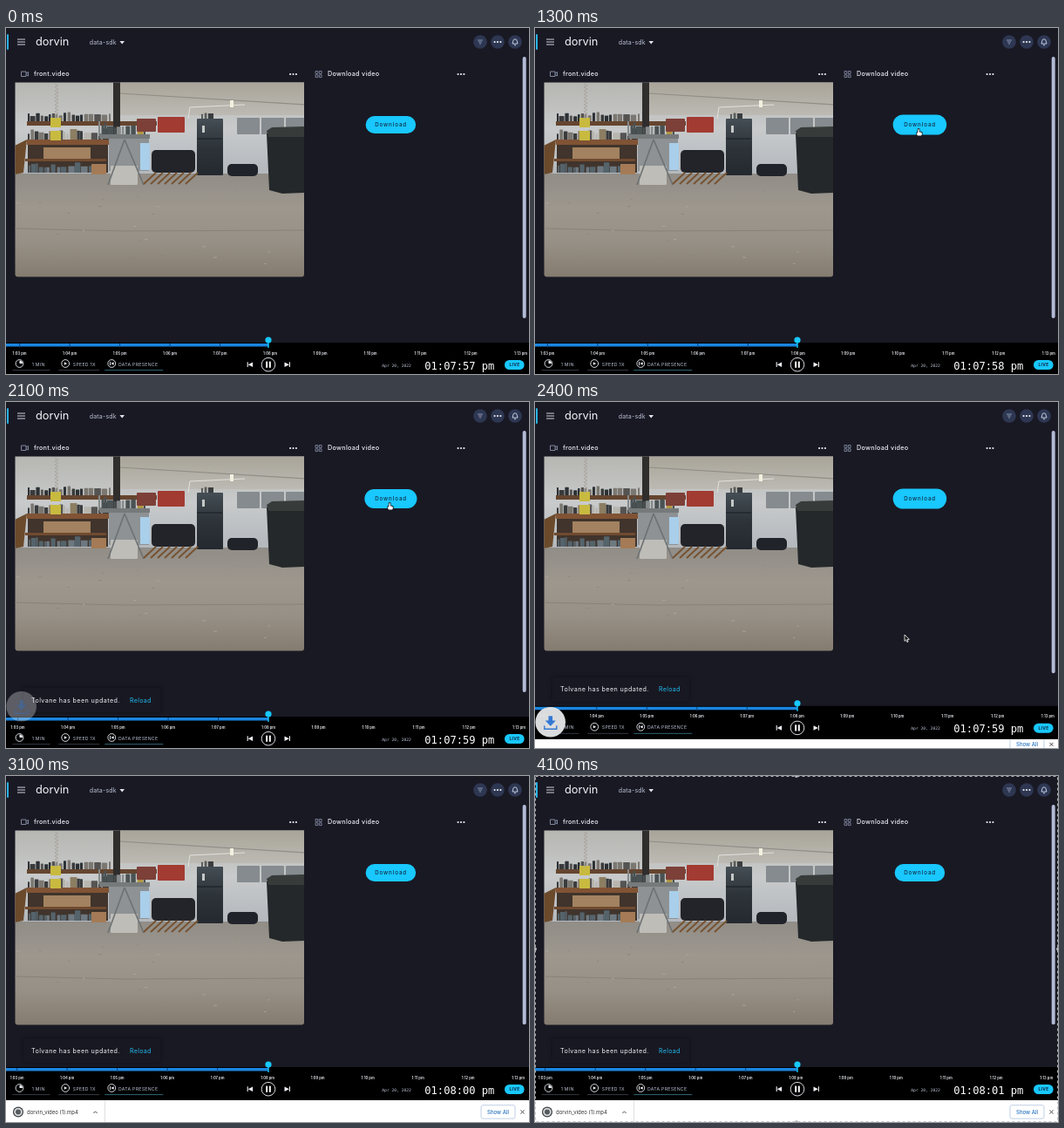
These frames come from a looping animation (600x397 px, 4.2 s). An HTML page with a canvas:

```html
<!DOCTYPE html>
<html lang="en">
<head>
<meta charset="utf-8">
<title>Robot video console</title>
<style>
  html, body { margin: 0; width: 100%; height: 100%; overflow: hidden; background: #191924; }
  canvas { display: block; width: 600px; height: 397px; }
</style>
</head>
<body>
<canvas id="stage"></canvas>
<script>
const W = 600, H = 397, LOOP = 4200, STEP = 100;
const CYAN = '#18c8ff', BG = '#191924', MUTED = '#bcc4d6', LIGHT = '#eef0f5';
const SANS = 'Inter, sans-serif', MONO = '"DejaVu Sans Mono", monospace';

const canvas = document.getElementById('stage');
const ctx = canvas.getContext('2d');
const dpr = window.devicePixelRatio || 1;
canvas.width = W * dpr;
canvas.height = H * dpr;

// Progress from 0 to 1 between two times.
const ramp = (t, start, end) => Math.min(1, Math.max(0, (t - start) / (end - start)));

function seeded(seed) {
  return () => (seed = (seed * 16807) % 2147483647) / 2147483647;
}

function box(x, y, w, h, color, r = 0) {
  ctx.fillStyle = color;
  ctx.beginPath();
  ctx.roundRect(x, y, w, h, r);
  ctx.fill();
}

function frame(x, y, w, h, color, r = 0) {
  ctx.strokeStyle = color;
  ctx.lineWidth = 0.9;
  ctx.beginPath();
  ctx.roundRect(x, y, w, h, r);
  ctx.stroke();
}

function dot(x, y, r, color) {
  ctx.fillStyle = color;
  ctx.beginPath();
  ctx.arc(x, y, r, 0, 7);
  ctx.fill();
}

function ring(x, y, r, color = LIGHT, width = 0.9, from = 0, to = Math.PI * 2) {
  ctx.strokeStyle = color;
  ctx.lineWidth = width;
  ctx.beginPath();
  ctx.arc(x, y, r, from, to);
  ctx.stroke();
}

function trace(pts) {
  ctx.beginPath();
  pts.forEach(([x, y]) => ctx.lineTo(x, y));
}

function line(color, width, ...pts) {
  ctx.strokeStyle = color;
  ctx.lineWidth = width;
  trace(pts);
  ctx.stroke();
}

function poly(color, ...pts) {
  ctx.fillStyle = color;
  trace(pts);
  ctx.fill();
}

// Triangle pointing along dir (+1 right, -1 left).
function arrowhead(x, y, size, dir) {
  poly(LIGHT, [x - dir * size, y - size], [x + dir * size, y], [x - dir * size, y + size]);
}

function text(str, x, y, size, color, { weight = 400, gap = 0, align = 'left', font = SANS } = {}) {
  ctx.font = `${weight} ${size}px ${font}`;
  ctx.letterSpacing = gap + 'px';
  ctx.textAlign = align;
  ctx.fillStyle = color;
  ctx.fillText(str, x, y);
}

function dots(x, y) {
  for (let i = -1; i <= 1; i++) dot(x + i * 3.4, y, 1.1, LIGHT);
}

function drawHeader() {
  box(1, 7, 2, 18, '#27b4e6', 1);
  for (let y = 13; y <= 19; y += 3) line('#dfe4ee', 0.9, [13, y], [22, y]);
  text('dorvin', 34, 20, 12.8, '#f4f6fa');
  text('data-sdk', 95.7, 18.6, 7, MUTED, { gap: 0.2 });
  poly('#e4e8f0', [130.5, 15], [136, 15], [133.2, 18.4]);

  for (let x = 544; x <= 584; x += 20) dot(x, 16, 7.8, '#2e3752');
  for (let i = 0; i < 3; i++) line('#aebbdc', 0.7, [541 + i, 14 + i * 2], [547 - i, 14 + i * 2]);
  dots(564, 16);
  ring(584, 15, 2.2, '#d0daf0', 0.9, Math.PI, 0);
  line('#d0daf0', 0.9, [581.8, 15], [581, 18], [587, 18], [586.2, 15]);
  dot(584, 19.6, 0.8, '#d0daf0');
}

function drawPanelTitles() {
  const style = { weight: 500, gap: 0.3 };
  frame(17.5, 50, 5.5, 5.5, '#8c94aa');
  line('#8c94aa', 0.9, [23, 52], [25.5, 50.5], [25.5, 55], [23, 53.5]);
  text('front.video', 32, 55, 7.2, LIGHT, style);
  dots(329.5, 53);
  for (let i = 0; i < 4; i++)
    frame(355 + (i % 2) * 4.3, 49.5 + (i >> 1) * 4.3, 2.8, 2.8, '#7f879e');
  text('Download video', 369, 55, 7.2, LIGHT, style);
  dots(522, 53);
}

function vertical(y0, y1, ...colors) {
  const g = ctx.createLinearGradient(0, y0, 0, y1);
  colors.forEach((c, i) => g.addColorStop(i / (colors.length - 1), c));
  return g;
}

// A row of small things of varied width and height standing on a base line.
function clutter(seed, x, end, base, tall, colors) {
  const rand = seeded(seed);
  while (x < end) {
    const w = 2 + rand() * 6, h = tall * (0.5 + rand() / 2);
    box(x, base - h, Math.min(w, end - x), h, colors[Math.floor(rand() * colors.length)], 0.6);
    x += w + rand() * 2;
  }
}

function drawRoom() {
  box(10, 62, 333, 106, vertical(62, 168, '#b6b6b1', '#c8cacb', '#b3b8bd'));
  box(131, 62, 212, 38, vertical(62, 100, '#a8a499', '#bcbab3'));
  line('#8f8d86', 1.2, [131, 75], [343, 88]);
  box(10, 167, 333, 119, vertical(167, 285, '#918d87', '#9d978e', '#979086', '#857c70'));
  line('#87827a', 1, [10, 230], [135, 233], [343, 232]);
  const rand = seeded(9);
  for (let i = 0; i < 25; i++)
    box(12 + rand() * 326, 182 + rand() * 100, 1 + rand() * 3, 0.8, i % 3 ? '#8a847a' : '#b0aba0');
}

function drawWorkbench() {
  const tools = ['#3a3b3c', '#555452', '#7b7771', '#2c3135'];
  clutter(5, 25, 120, 107, 11, tools);
  box(24, 107, 149, 5, '#65452f');
  clutter(8, 25, 120, 128, 13, [...tools, '#8c7e62', '#b8b6ae']);
  box(24, 128, 94, 6, '#805334');
  box(25, 134, 92, 32, '#40342c');
  box(43, 137, 54, 14, '#a28260');
  box(22, 150, 93, 3, '#704a30');
  clutter(3, 26, 98, 166, 12, ['#55636b', '#b8bdc0', '#6d7880']);
  box(98, 156, 17, 12, '#a47b56');
  poly('#6b4a2b', [10, 135], [24, 128], [20, 166], [10, 168]);
  for (const y of [103, 118]) box(51, y, 12, 11, '#c8ba3f');
  for (let y = 64; y < 102; y += 4) line('#a5a099', 0.8, [56, y], [60, y + 2], [56, y + 4]);
  box(123, 62, 8, 60, '#302d2d');
}

function drawSaw() {
  box(118, 126, 46, 38, '#8e9294');
  box(154, 132, 11, 31, '#a9cfea');
  clutter(6, 106, 160, 124, 19, ['#2a3336', '#4a5254', '#858a8b', '#b09642']);
  box(107, 122, 58, 5, '#777a7b');
  box(120, 158, 31, 22, '#bebdb7', 1);
  for (const x of [117, 158]) line('#6c7173', 1.6, [136, 128], [x, 180]);
}

function drawAppliances() {
  box(150, 104, 22, 15, '#7d4038', 1);
  box(174, 102, 31, 18, '#a23b32', 1);
  line('#e1e2dc', 1, [209, 104], [211, 91], [274, 88]);
  box(257, 83, 4, 8, '#f2f0df');
  clutter(4, 224, 238, 104, 7, ['#595d5b', '#3a3d3f']);
  box(219, 104, 30, 65, vertical(104, 169, '#454e55', '#2d3339', '#24292f'), 1);
  line('#171c20', 1, [219, 127], [248, 127]);
  box(225, 112, 3, 8, '#c5c9c7');
  box(167, 140, 50, 26, '#222429', 5);
  box(254, 156, 35, 14, '#202329', 5);
  for (let x = 265; x < 343; x += 28) box(x, 103, 26, 19, '#858b8e', 1);
  for (let x = 158; x < 212; x += 8) line(x % 16 ? '#765332' : '#ad8f64', 2, [x, 179], [x + 14, 166]);
  poly('#24282a', [299, 121], [343, 119], [343, 189], [317, 190], [302, 186]);
  poly('#373b3a', [299, 118], [305, 114], [343, 113], [343, 125], [301, 125]);
}

function drawVideo() {
  ctx.save();
  ctx.beginPath();
  ctx.roundRect(10.5, 62.5, 331.5, 223, [0, 0, 3, 3]);
  ctx.clip();
  drawRoom();
  drawWorkbench();
  drawSaw();
  drawAppliances();
  ctx.restore();
}

function drawButton(t) {
  const press = 0.35 * Math.sin(Math.PI * ramp(t, 1900, 2300));
  const grow = ramp(t, 900, 1100) - press - ramp(t, 2500, 2700);
  const w = 57.5 + 4 * grow, h = 20 + 3 * grow;
  box(441.4 - w / 2, 111 - h / 2, w, h, CYAN, h / 2);
  text('Download', 441.6, 113.2, 6.2, '#132b42', { weight: 500, gap: 0.9, align: 'center' });
}

function control(x, width, label, labelX, underline = '#434957') {
  ring(x, 385, 4.4);
  text(label, labelX, 387.5, 5.2, MUTED, { gap: 0.28 });
  line(underline, 0.8, [x - 8, 392.6], [x - 8 + width, 392.6]);
}

function drawControls() {
  control(15.5, 43, '1 MIN', 29.7);
  control(68.2, 47, 'SPEED 1X', 76.8);
  control(121.3, 67, 'DATA PRESENCE', 129, '#3b7f92');
  box(15.5, 381.5, 3.5, 3.5, LIGHT, [0, 3.5, 0, 0]);
  arrowhead(68.5, 385, 1.7, 1);
  arrowhead(122, 385, 1.7, -1);
  line(LIGHT, 0.9, [119.5, 383], [119.5, 387]);

  for (const side of [-1, 1]) {
    const x = 301.3 + side * 21.4;
    arrowhead(x - side * 0.5, 386.2, 2.7, side);
    line(LIGHT, 1.1, [x + side * 2.7, 383.3], [x + side * 2.7, 389.1]);
  }
  ring(301, 386.2, 7.8);
  for (const x of [298.2, 301.9]) box(x, 382.6, 1.9, 7.2, '#fff');
}

function drawTimeline(t) {
  const firstLabel = 15.6 - 57.5 * t / 60000;
  box(0, 361, W, 38, '#000');
  box(0, 362, 301, 3.4, '#1b86e0');
  for (let i = 0; i < 11; i++) {
    const x = firstLabel + i * 57.5;
    if (x < 299) box(x - 0.5, 362, 1, 4.5, '#0d447c');
    text(`1:${String(3 + i).padStart(2, '0')} pm`, x, 374.7, 4.2, LIGHT, { weight: 600, align: 'center' });
  }
  box(300.3, 358, 1.4, 9, CYAN);
  dot(301, 358, 3.6, CYAN);
  drawControls();

  const seconds = 7 * 60 + 57 + Math.floor(t / 1000);
  const [min, sec] = [seconds / 60, seconds % 60].map(n => String(Math.floor(n)).padStart(2, '0'));
  text('Apr 20, 2022', 431.3, 388.6, 4.65, MUTED, { font: MONO });
  text(`01:${min}:${sec} pm`, 480.3, 391.6, 12.1, '#fff', { font: MONO });
  box(572, 381, 22.6, 11, CYAN, 5.5);
  text('LIVE', 583.5, 388.4, 4.9, '#12283c', { weight: 700, gap: 0.3, align: 'center' });
}

function drawToast() {
  ctx.save();
  ctx.shadowColor = 'rgba(0,0,0,.45)';
  ctx.shadowBlur = 5;
  box(20, 328, 157, 28, '#181822', 2);
  ctx.restore();
  text('Tolvane has been updated.', 29, 344.6, 7.2, LIGHT, { gap: 0.4 });
  text('Reload', 142, 344.6, 7.1, '#20bdf2', { gap: 0.3 });
}

function drawShelf(t, shift) {
  const top = 399 - shift, mid = 399 - shift / 2;
  ctx.save();
  ctx.beginPath();
  ctx.rect(0, top, W, H - top);
  ctx.clip();
  box(0, top, W, 30, '#fff');
  frame(545, mid - 7.8, 39, 15.4, '#b9cbe2', 2);
  text('Show All', 564.5, mid + 2.1, 6, '#2470bd', { weight: 500, align: 'center' });
  for (const d of [-2, 2]) line('#3f4347', 1, [590.5, mid - d], [594.5, mid + d]);

  ctx.globalAlpha = ramp(t, 2400, 2700);
  dot(14, mid, 6, '#34383c');
  dot(14, mid, 4.8, '#d8dadb');
  dot(14, mid, 3, '#555b60');
  text('dorvin_video (1).mp4', 24, mid + 2.2, 6, '#303235');
  line('#505458', 1, [100.4, mid + 1.5], [102.5, mid - 0.7], [104.6, mid + 1.5]);
  line('#d7d9dc', 0.8, [113.5, top], [113.5, H]);
  ctx.restore();
}

function drawDownloadBadge(t) {
  const p = ramp(t, 2045, 2645);
  const y = 346 + 36 * p;
  ctx.save();
  ctx.globalAlpha = 1 - 4 * (p - 0.5) ** 2;
  dot(17.7, y, 17.3, '#e2e4e6');
  box(15.5, y - 7, 4.6, 6, '#2d75d2');
  poly('#2d75d2', [11.7, y - 1.8], [23.8, y - 1.8], [17.8, y + 4.7]);
  line('#2d75d2', 1.4, [10.8, y + 4], [10.8, y + 8], [24.8, y + 8], [24.8, y + 4]);
  ctx.restore();
}

function drawHand() {
  for (const [pad, color] of [[0.7, '#111'], [0, '#fff']]) {
    box(-0.6 - pad, -pad, 1.4 + 2 * pad, 5 + 2 * pad, color, 0.8);
    box(-1.8 - pad, 3.4 - pad, 5.6 + 2 * pad, 4 + 2 * pad, color, 1.5);
  }
}

function drawArrow() {
  poly('#111', [0, 0], [0, 7.4], [1.7, 5.8], [3, 8.6], [4.2, 8], [3, 5.4], [5.4, 5.3]);
  ctx.closePath();
  ctx.strokeStyle = '#fff';
  ctx.lineWidth = 0.8;
  ctx.stroke();
}

function drawCursor(t) {
  const away = 1 - ramp(t, 300, 700), leaving = Math.max(0, t - 2200);
  const x = 440 + 22 * away - 0.08 * leaving;
  const y = 121 + 279 * away - 5 * ramp(t, 800, 1000) + 0.755 * leaving;
  if (y > H) return;
  ctx.save();
  ctx.translate(x, y);
  if (t >= 1000 && !leaving) drawHand();
  else drawArrow();
  ctx.restore();
}

function drawSelection() {
  ctx.setLineDash([3, 3]);
  frame(0.5, 0.5, W - 1, H - 1, '#bfc1c5');
  ctx.setLineDash([]);
  for (const side of [0, 1]) {
    dot(side * W, H / 2, 2, '#b9bbc0');
    dot(W / 2, side * H, 2, '#b9bbc0');
  }
}

function draw(t) {
  ctx.setTransform(dpr, 0, 0, dpr, 0, 0);
  box(0, 0, W, H, BG);
  const shift = 27 * ramp(t, 2300, 2520);
  drawHeader();
  drawPanelTitles();
  drawVideo();
  drawButton(t);
  box(592.7, 33, 4, 300 - shift * 1.77, '#b2bad6', 2);

  ctx.save();
  ctx.translate(0, -shift);
  drawTimeline(t);
  if (t >= 2000) drawToast();
  ctx.restore();

  if (shift > 0) drawShelf(t, shift);
  drawDownloadBadge(t);
  drawCursor(t);
  if (t >= 4000) drawSelection();
}

function tick() {
  const t = performance.now() % LOOP;
  draw(Math.floor(t / STEP) * STEP);
  requestAnimationFrame(tick);
}
tick();
</script>
</body>
</html>
```
